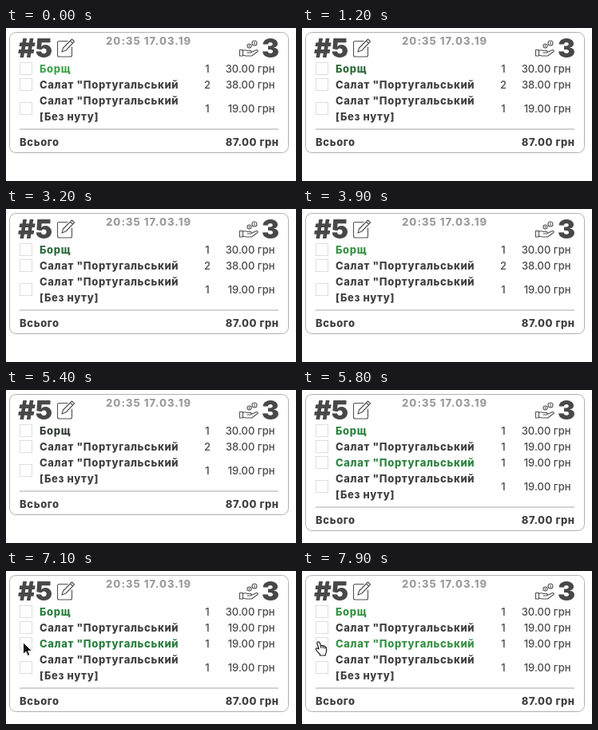
An HTML page for the animation above (8 s loop, 363 px wide and 192 px high).

```html
<!DOCTYPE html>
<html lang="uk">
<head>
<meta charset="utf-8">
<title>Замовлення</title>
<style>
  html, body { margin: 0; width: 100%; height: 100%; overflow: hidden; background: #fff; }
  svg { display: block; width: 363px; height: 192px; }
  text { font: 500 13px Inter, "Open Sans", sans-serif; fill: #4a4a4a; white-space: pre; }
  .bold { font-weight: 800; letter-spacing: .65px; fill: #404040; }
  .sum { font-weight: 800; letter-spacing: .5px; fill: #404040; }
  .head { font-size: 33px; font-weight: 900; fill: #484848; }
  .date { font-weight: 800; letter-spacing: 1.05px; fill: #9c9c9c; }
  .end { text-anchor: end; }
  .mid { text-anchor: middle; }
  .box { fill: #fff; stroke: #dedede; }
  .icon { fill: none; stroke: #505050; stroke-width: 1.1; stroke-linejoin: round; stroke-linecap: round; }
</style>
</head>
<body>
<svg viewBox="0 0 363 192">
  <rect id="card" x="4.5" y="5.5" width="349" height="151" rx="8" fill="#fff" stroke="#b0b0b0"/>
  <text class="head" x="15" y="37">#5</text>
  <g class="icon">
    <path d="M77 16.5H66.500a2 2 0 0 0-2 2V34a2 2 0 0 0 2 2H80.500a2 2 0 0 0 2-2V24"/>
    <path d="M70 30l1.500-5L82.500 14l3 3L75 28zM80.500 16l3 3"/>
  </g>
  <text class="date" x="125" y="20.500">20:35 17.03.19</text>
  <g class="icon">
    <circle cx="304.500" cy="22.500" r="2.500"/>
    <circle cx="311" cy="19" r="3"/>
    <path d="M311 17.800v2.400M304.500 21.800v1.400"/>
    <path d="M292.500 27.500h4v7.500h-4z"/>
    <path d="M296.500 28.500q3-1.500 5.500 0h4.500q1.500 1.500 0 2.500h-4.500M307 30.500l6.500-3q2.500 0 1.500 2l-7.500 5.500h-7l-4-1"/>
  </g>
  <text class="head end" x="342" y="37">3</text>

  <g id="first"></g>
  <g id="second"></g>
  <g id="extra"></g>
  <g id="last"></g>
  <g id="footer">
    <path d="M17 127H341" stroke="#c4c4c4" stroke-width="1.500"/>
    <text class="bold" x="17" y="148">Всього</text>
    <text class="sum end" x="341.500" y="148">87.00 грн</text>
  </g>

  <path id="arrow" d="M0 0V15L3.500 11.800L5.800 17L8.400 15.800L6.200 10.800H11Z" fill="#111" stroke="#fff"/>
  <path id="hand" transform="translate(16.500 88)" fill="#fff" stroke="#222" stroke-width="1.200" stroke-linejoin="round"
    d="M4.500 10L2.500 3Q2.200 1 3.700 .8T5.800 2.200L7 6Q9 4.500 9.700 6.200Q11.500 5.200 12.200 7Q14 6.800 14 9V13Q13.800 15 12.800 16.200V18H6V16.500Q3 14 .8 10.500Q.6 8.500 2.500 9Z M7 6L7.500 9M9.700 6.200L10 9M12.200 7V9.500"/>
</svg>
<script>
const LOOP = 8000, STEP = 100, SPLIT_AT = 5500, HAND_AT = 7300, ROW = 20;
const $ = id => document.getElementById(id);

function fillRow(id, y, lines, count, price) {
  const center = y + (lines.length - 1) * ROW / 2;
  $(id).innerHTML =
    `<rect class="box" x="17.500" y="${center - 7.500}" width="15" height="15"/>` +
    lines.map((s, i) => `<text class="bold name" x="42" y="${y + 5 + i * ROW}">${s}</text>`).join('') +
    `<text class="mid count" x="252" y="${center + 5}">${count}</text>` +
    `<text class="end price" x="336.500" y="${center + 5}">${price}.00 грн</text>`;
}

const salad = 'Салат "Португальський';
fillRow('first', 51, ['Борщ'], 1, 30);
fillRow('second', 71, [salad], 2, 38);
fillRow('extra', 91, [salad], 1, 19);
fillRow('last', 91, [salad, '[Без нуту]'], 1, 19);

const blinking = ['first', 'extra'].map(id => $(id).querySelector('.name'));
const secondCount = $('second').querySelector('.count');
const secondPrice = $('second').querySelector('.price');

// Interpolates stops of the form [position, ...values].
function ramp(stops, x) {
  let i = 1;
  while (i < stops.length - 1 && x > stops[i][0]) i++;
  const [a, b] = [stops[i - 1], stops[i]];
  const k = Math.min(1, Math.max(0, (x - a[0]) / (b[0] - a[0])));
  return a.slice(1).map((v, j) => v + (b[j + 1] - v) * k);
}

const PULSE = [[0, 54, 54, 54], [.34, 42, 128, 62], [.6, 68, 170, 78], [1, 82, 188, 92]];
const PATH = [[6400, 285, 192], [6500, 286, 182.5], [6700, 210, 157], [6900, 70, 107], [7050, 21.5, 89.5]];

function pulseColor(t) {
  const phase = (t + 560) % 2000 / 1000;
  return `rgb(${ramp(PULSE, 1 - Math.abs(1 - phase)).map(Math.round)})`;
}

function show(el, on) { el.style.display = on ? '' : 'none'; }

function draw(time) {
  const t = Math.floor(time % LOOP / STEP) * STEP;
  const split = t >= SPLIT_AT;
  const shift = `translate(0 ${split ? ROW : 0})`;

  for (const name of blinking) name.style.fill = pulseColor(t);
  show($('extra'), split);
  secondCount.textContent = split ? 1 : 2;
  secondPrice.textContent = split ? '19.00 грн' : '38.00 грн';
  $('last').setAttribute('transform', shift);
  $('footer').setAttribute('transform', shift);
  $('card').setAttribute('height', 151 + (split ? ROW : 0));

  show($('arrow'), t >= PATH[0][0] && t < HAND_AT);
  show($('hand'), t >= HAND_AT);
  $('arrow').setAttribute('transform', `translate(${ramp(PATH, t)})`);
}

const start = performance.now();
function tick() {
  draw(performance.now() - start);
  requestAnimationFrame(tick);
}
tick();
</script>
</body>
</html>
```
